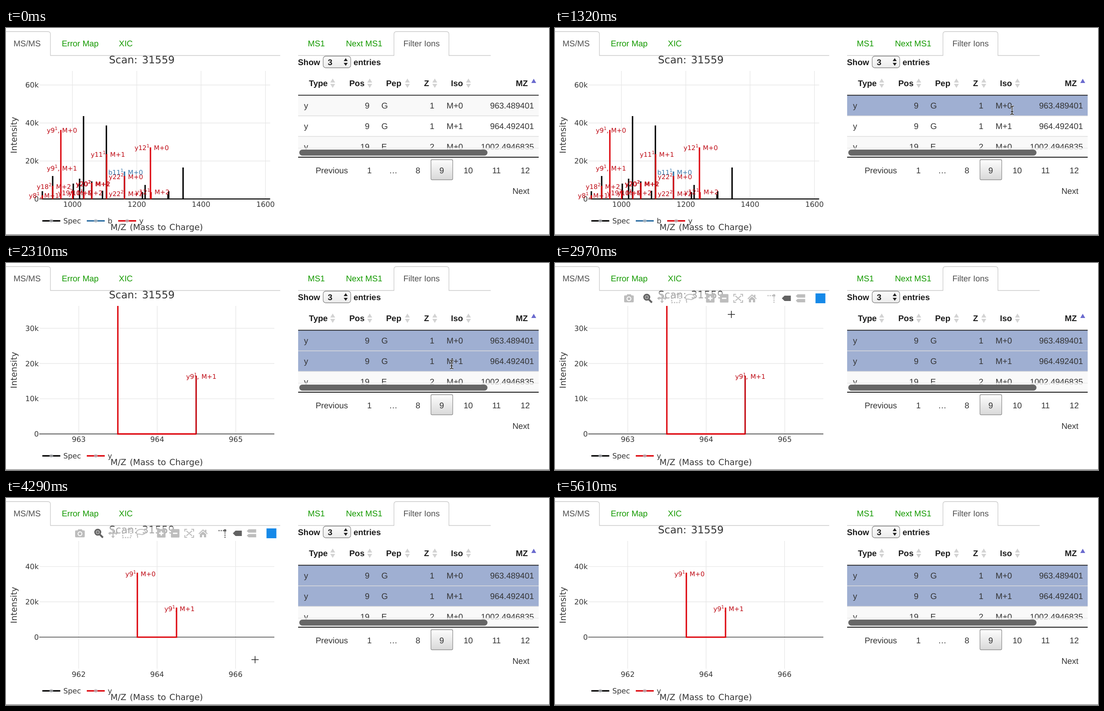
Animation, 1210 px wide and 463 px high, one loop 5940 ms. Source, as an HTML page:

```html
<!DOCTYPE html>
<html lang="en">
<head>
<meta charset="utf-8">
<title>Spectrum viewer</title>
<style>
html, body { margin: 0; width: 100%; height: 100%; overflow: hidden; background: #fff; }
svg { display: block; width: 1210px; height: 463px; }
text { text-rendering: geometricPrecision; white-space: pre; }
.ui { font: 18.5px "Liberation Sans", Arial, sans-serif; fill: #333; }
.bold { font-weight: bold; fill: #1c1c1c; }
.tab { fill: #149a00; }
.on { fill: #505050; }
.plot { font: 16.2px "DejaVu Sans", Verdana, sans-serif; fill: #363636; }
.title { font-size: 22.9px; word-spacing: .12em; }
.axis { font-size: 18.8px; word-spacing: .08em; }
.ion { font: 14.3px "DejaVu Sans", Verdana, sans-serif; fill: #bd0712; word-spacing: .06em; }
.blue { fill: #3474a8; }
.tip { font-size: 16.2px; fill: #fff; }
</style>
</head>
<body>
<svg id="stage" viewBox="0 0 1210 463" xmlns="http://www.w3.org/2000/svg">
  <defs>
    <linearGradient id="button" x2="0" y2="1"><stop stop-color="#fdfdfd"/><stop offset="1" stop-color="#d9d9d9"/></linearGradient>
    <linearGradient id="select" x2="0" y2="1"><stop stop-color="#fbfbfb"/><stop offset="1" stop-color="#ececec"/></linearGradient>
  </defs>
</svg>
<script>
const NS = "http://www.w3.org/2000/svg";
const stage = document.getElementById("stage");
const STEP = 330, STEPS = 18;
const RED = "#dd060e", BLUE = "#2e6fa3", LIGHT = "#bdbdbd", DARK = "#626262";
const ODD = "#f9f9f9", HOVER = "#f5f5f5", PICKED = "#9fafd2";
const FLOOR = 382.4, LINE = 3.1;

function add(parent, tag, attrs = {}, content) {
  const el = document.createElementNS(NS, tag);
  for (const key in attrs) el.setAttribute(key, attrs[key]);
  if (content !== undefined) el.textContent = content;
  parent.appendChild(el);
  return el;
}
const group = (parent = stage) => add(parent, "g");
const text = (parent, x, y, str, cls, anchor = "start") =>
  add(parent, "text", { x, y, class: cls, "text-anchor": anchor }, str);
const path = (parent, d, stroke, width = 1.4, fill = "none") =>
  add(parent, "path", { d, stroke, "stroke-width": width, fill });
const shape = (parent, d, fill) => add(parent, "path", { d, fill });
const rect = (parent, x, y, width, height, fill, more = {}) =>
  add(parent, "rect", { x, y, width, height, fill, ...more });
const show = (el, on) => el.setAttribute("visibility", on ? "visible" : "hidden");

// Tabs
path(stage, "M0 8H93Q99 8 99 14V61.5H611", "#c9c9c9", 1.3);
path(stage, "M651 61.5H864.5V14Q864.5 8 870.5 8H981Q987 8 987 14V61.5H1080", "#c9c9c9", 1.3);
for (const [x, label, on] of [[47, "MS/MS", 1], [165.3, "Error Map"], [267, "XIC"],
  [691.5, "MS1"], [798, "Next MS1"], [926, "Filter Ions", 1]])
  text(stage, x, 41.3, label, "ui " + (on ? "on" : "tab"), "middle");
path(stage, "M0 462.3H1210", "#8f8f8f", 1.4);

// Table
text(stage, 650.5, 82.8, "Show", "ui bold");
rect(stage, 706.7, 63, 61.5, 26, "url(#select)", { rx: 6, stroke: "#8a8a8a", "stroke-width": 1.3 });
text(stage, 717, 82.8, "3", "ui bold");
shape(stage, "M752.5 74L757 67.5L761.5 74ZM752.5 78L757 84.5L761.5 78Z", "#222");
text(stage, 774.5, 82.8, "entries", "ui bold");
[[675, "Type", 728], [765, "Pos", 810.5], [847, "Pep", 894.5], [931.5, "Z", 955.5], [991.5, "Iso", 1030.5]]
  .forEach(([x, label, cx]) => {
    text(stage, x, 130.3, label, "ui bold");
    shape(stage, `M${cx - 5.5} 122L${cx} 113L${cx + 5.5} 122ZM${cx - 5.5} 125L${cx} 134L${cx + 5.5} 125Z`, "#d3d3d3");
  });
text(stage, 1136, 130.3, "MZ", "ui bold");
shape(stage, "M1170.5 123L1176 113.5L1181.5 123Z", "#6a6ace");

const rows = [["9", "G", "1", "M+0", "963.489401"], ["9", "G", "1", "M+1", "964.492401"],
  ["19", "E", "2", "M+0", "1002.4946835"]].map(([pos, pep, z, iso, mz], i) => {
  const top = 150.5 + 46 * i, base = top + 29.8;
  const bg = rect(stage, 651, top, 536, 46, i === 1 ? "#fff" : ODD);
  if (i) path(stage, `M651 ${top}H1187`, "#dcdcdc", 1.3);
  text(stage, 664, base, "y", "ui");
  text(stage, 810, base, pos, "ui", "end");
  text(stage, 836.5, base, pep, "ui");
  text(stage, 954.5, base, z, "ui", "end");
  text(stage, 1000, base, iso, "ui", "middle");
  text(stage, 1176.5, base, mz, "ui", "end");
  return bg;
});
rect(stage, 651, 268.5, 536, 20, "#fafafa", { "fill-opacity": .8 });
path(stage, "M651 268.8H1187", "#e2e2e2", 1);
rect(stage, 653.5, 272, 419.5, 13.6, "#666", { rx: 6.8 });
path(stage, "M651 150.3H1187M651 289H1187", "#1a1a1a", 1.8);

rect(stage, 947, 294.5, 48.5, 45, "url(#button)", { rx: 2.5, stroke: "#8f8f8f", "stroke-width": 1.3 });
[[726, "Previous"], [810, "1"], [863, "…"], [918, "8"], [971, "9"], [1030, "10"], [1093, "11"], [1157, "12"]]
  .forEach(([x, label]) => text(stage, x, 324.7, label, "ui", "middle"));
text(stage, 1147.5, 371, "Next", "ui", "middle");

// Plots
function ion(parent, [x, y, name, charge, iso], cls = "") {
  const el = text(parent, x, y, "", "ion " + cls);
  add(el, "tspan", {}, name);
  add(el, "tspan", { dy: -5.6, "font-size": 10 }, charge);
  add(el, "tspan", { dy: 5.6 }, ", M+" + iso);
}
function legend(parent, names) {
  const colors = { Spec: "#000", b: BLUE, y: RED };
  names.forEach((name, i) => {
    const x = [81, 180, 250][i];
    path(parent, `M${x} 431.4H${x + 40}`, colors[name], LINE);
    add(parent, "circle", { cx: x + 20, cy: 431.4, r: 4.2, fill: "#b9bcc0", "fill-opacity": .7 });
    text(parent, x + 46.8, 437.2, name, "plot");
  });
}
function chart({ right, xs, ys, zero, names }) {
  const g = group();
  for (const [x, label] of xs) {
    if (x > 76) path(g, `M${x} 96V382`, "#e8e8e8");
    text(g, x, 400.3, label, "plot", "middle");
  }
  for (const [y, label] of ys) {
    path(g, `M75 ${y}H${right}`, "#e8e8e8");
    text(g, 73, y + 5.8, label, "plot", "end");
  }
  path(g, `M74 ${zero}H${right}`, "#444", 1.6);
  text(g, 73, zero + 5.8, "0", "plot", "end");
  legend(g, names);
  return g;
}
const peaks = (g, list, color) =>
  path(g, list.map(([x, y]) => `M${x} ${FLOOR}V${y}`).join(""), color, LINE);

const full = chart({ right: 588.5, zero: FLOOR, names: ["Spec", "b", "y"],
  xs: [[148, 1000], [291.5, 1200], [434.6, 1400], [578.3, 1600]],
  ys: [[127.5, "60k"], [212.5, "40k"], [297.5, "20k"]] });
path(full, `M80 ${FLOOR}H588.5`, "#111", 2.2);
peaks(full, [[81, 365], [104, 331], [150, 348], [164, 337], [172.8, 197], [191, 343], [215, 364], [223.7, 218],
  [304, 367], [310, 351], [361, 371], [362.6, 365], [394.6, 312]], "#000");
peaks(full, [[264, 321]], BLUE);
peaks(full, [[81, 374], [104, 353], [122.2, 228], [148.5, 364], [173.5, 366], [191.2, 346], [224.2, 282],
  [264, 331], [321.9, 267], [323.2, 367]], RED);
[[91, 234, "y9", "1", 0], [91, 319, "y9", "1", 1], [68.5, 360, "y18", "2", 2], [51, 380, "y8", "1", 1],
 [116, 374, "y19", "2", 0], [139, 374, "y10", "1", 2], [155.5, 354, "y20", "2", 1], [156.5, 354, "y20", "2", 2],
 [189, 288, "y11", "1", 1], [286.5, 273, "y12", "1", 0], [229, 337.5, "y22", "2", 0], [229, 376, "y22", "2", 2],
 [288, 372, "y12", "1", 2]].forEach(p => ion(full, p));
ion(full, [228, 328, "b11", "1", 0], "blue");

const zoomY = [[146, "30k"], [224.7, "20k"], [303.6, "10k"]];
const single = chart({ right: 598, zero: FLOOR, names: ["Spec", "y"], ys: zoomY,
  xs: [[75, 962.5], [206.3, 963], [337, 963.5], [468.4, 964]] });
peaks(single, [[336.4, 96]], RED);

const pair = chart({ right: 598, zero: FLOOR, names: ["Spec", "y"], ys: zoomY,
  xs: [[162.2, 963], [337, 964], [512, 965]] });
path(pair, `M249.2 96V${FLOOR}H424`, RED, LINE);
path(pair, `M423.7 ${FLOOR + 1}V252`, "#c2070f", LINE);
ion(pair, [401.5, 259, "y9", "1", 1]);

const wide = chart({ right: 598, zero: 311.2, names: ["Spec", "y"],
  ys: [[153.4, "40k"], [232.3, "20k"]], xs: [[162, 962], [336.6, 964], [511.5, 966]] });
ion(wide, [266, 174.5, "y9", "1", 0]);
ion(wide, [353, 252.5, "y9", "1", 1]);
path(wide, "M292.7 167V311.2H380V245", RED, LINE);

const charts = [full, single, pair, wide];
text(stage, 302.7, 79.3, "Scan: 31559", "plot title", "middle");
text(stage, 335.8, 452.2, "M/Z (Mass to Charge)", "plot axis", "middle");
add(stage, "text", { transform: "translate(23.8 239.5) rotate(-90)", class: "plot axis", "text-anchor": "middle" }, "Intensity");

// Toolbar
const bar = group();
rect(bar, 150, 64.5, 457, 29, "#fff", { "fill-opacity": .55 });
shape(bar, "M154 74Q154 72.5 156 72.5H159.5L161 70H169L170.5 72.5H173.5Q175.5 72.5 175.5 74V86Q175.5 88 173.5 88H156Q154 88 154 86Z", LIGHT);
add(bar, "circle", { cx: 164.8, cy: 80, r: 4.3, fill: LIGHT, stroke: "#fff", "stroke-width": 2 });
add(bar, "circle", { cx: 204.5, cy: 76.5, r: 6.2, fill: "#aaa", stroke: DARK, "stroke-width": 3.2 });
path(bar, "M209.5 82L216 88.5", DARK, 4);
path(bar, "M201.5 76.5H207.5M204.5 73.5V79.5", DARK, 1.6);
path(bar, "M231 79H246M238.5 71.5V86.5", LIGHT, 2.4);
shape(bar, "M227.5 79L232.5 75V83ZM249.5 79L244.5 75V83ZM238.5 68L234.5 73H242.5ZM238.5 90L234.5 85H242.5Z", LIGHT);
rect(bar, 260, 70, 18.5, 18.5, "none", { stroke: LIGHT, "stroke-width": 2.6, "stroke-dasharray": "2.8 2.5" });
path(bar, "M294 82C286 77 293 70 301 70C312 70 314 79 305 81.5C301 83 297 79 293.5 81C290 83 295 85 293 89", LIGHT, 2);
rect(bar, 336.5, 69.5, 19, 19, LIGHT, { rx: 1.5 });
path(bar, "M341 79H351M346 74V84", "#fff", 2.8);
const minus = rect(bar, 367.5, 69.5, 19, 19, LIGHT, { rx: 1.5 });
path(bar, "M372 79H382", "#fff", 2.8);
path(bar, "M398.5 75V70H403.5M413 70H418V75M418 83V88H413M403.5 88H398.5V83M402 73.5L414.5 84.5M414.5 73.5L402 84.5", LIGHT, 2.2);
shape(bar, "M429 79.5L439 70L443.5 74V71H446.5V77L449.5 79.5L448 81L439 73L430.5 81ZM432 81L439 75L446 81V88H441V82.5H437V88H432Z", LIGHT);
const spike = group(bar);
path(spike, "M473.5 73H485M488 77V89", "currentColor", 2.4).setAttribute("stroke-dasharray", "2.6 2.2");
add(spike, "circle", { cx: 488, cy: 72.8, r: 3, fill: "currentColor" });
shape(bar, "M505.5 79L511.5 73H525.5V85H511.5Z", DARK);
shape(bar, "M536.5 74L540.5 70H557.5V77.5H540.5ZM536.5 84L540.5 80.5H557.5V88H540.5Z", LIGHT);
rect(bar, 580.5, 68, 22, 22, "#1689e8");

const tip = group();
rect(tip, 296.3, 99.8, 104.6, 36, "#545e7a", { rx: 3 });
text(tip, 348.6, 123, "Zoom out", "plot tip", "middle");

// Pointers
const beam = group();
const beamPath = "M-4-9.5Q0-9.5 0-6.5Q0-9.5 4-9.5M-4 9.5Q0 9.5 0 6.5Q0 9.5 4 9.5M0-7V7M-2.5 3H2.5";
path(beam, beamPath, "#fff", 3.2);
path(beam, beamPath, "#111", 1.5);
const cross = group();
path(cross, "M-8 0H8M0-8V8", "#fff", 3);
path(cross, "M-8 0H8M0-8V8", "#222", 1.5);
const hand = group();
path(hand, "M-5.5-8.5C-4-10-2.5-9-2-7.5L-.5-2.5C.5-4 2.5-3.5 3-2C4-3.3 5.8-2.8 6.2-1.2C7.5-2.3 9-1.2 9 .5V5C9 7 7.5 8 7.5 10H-1.5C-2 7.5-5.5 5-7.5 2C-8.8 0-6.5-1-5-.2L-3.5 1L-6-6.5Q-6.2-7.8-5.5-8.5Z", "#111", 1.4, "#fff");
path(hand, "M1 3.5V7M3.7 3.5V7M6.3 3.5V7", "#111", 1);

const pointers = { 3: [beam, 1021, 188], 4: [beam, 1018.5, 184], 5: [beam, 1018.5, 184],
  6: [beam, 993, 227], 7: [beam, 993, 227], 8: [cross, 540, 190], 9: [cross, 393, 115],
  10: [hand, 381, 92.5], 11: [hand, 381, 92.5], 12: [hand, 381, 92.5], 13: [cross, 555, 361.5] };

function draw(time) {
  const s = Math.floor(time / STEP) % STEPS;
  const view = s < 5 ? 0 : s < 7 ? 1 : s < 12 ? 2 : 3;
  charts.forEach((g, i) => show(g, i === view));
  rows[0].setAttribute("fill", s >= 4 ? PICKED : s === 3 ? HOVER : ODD);
  rows[1].setAttribute("fill", s >= 7 ? PICKED : s === 6 ? HOVER : "#fff");
  bar.setAttribute("opacity", s === 8 || s === 14 ? .5 : s > 8 && s < 14 ? 1 : 0);
  minus.setAttribute("fill", s === 11 || s === 12 ? DARK : LIGHT);
  spike.setAttribute("color", s === 13 ? DARK : LIGHT);
  show(tip, s === 11 || s === 12);
  const [active, x, y] = pointers[s] || [];
  for (const p of [beam, cross, hand]) show(p, p === active);
  if (active) active.setAttribute("transform", `translate(${x} ${y})`);
}

const start = performance.now();
function tick() {
  draw(performance.now() - start);
  requestAnimationFrame(tick);
}
tick();
</script>
</body>
</html>
```
